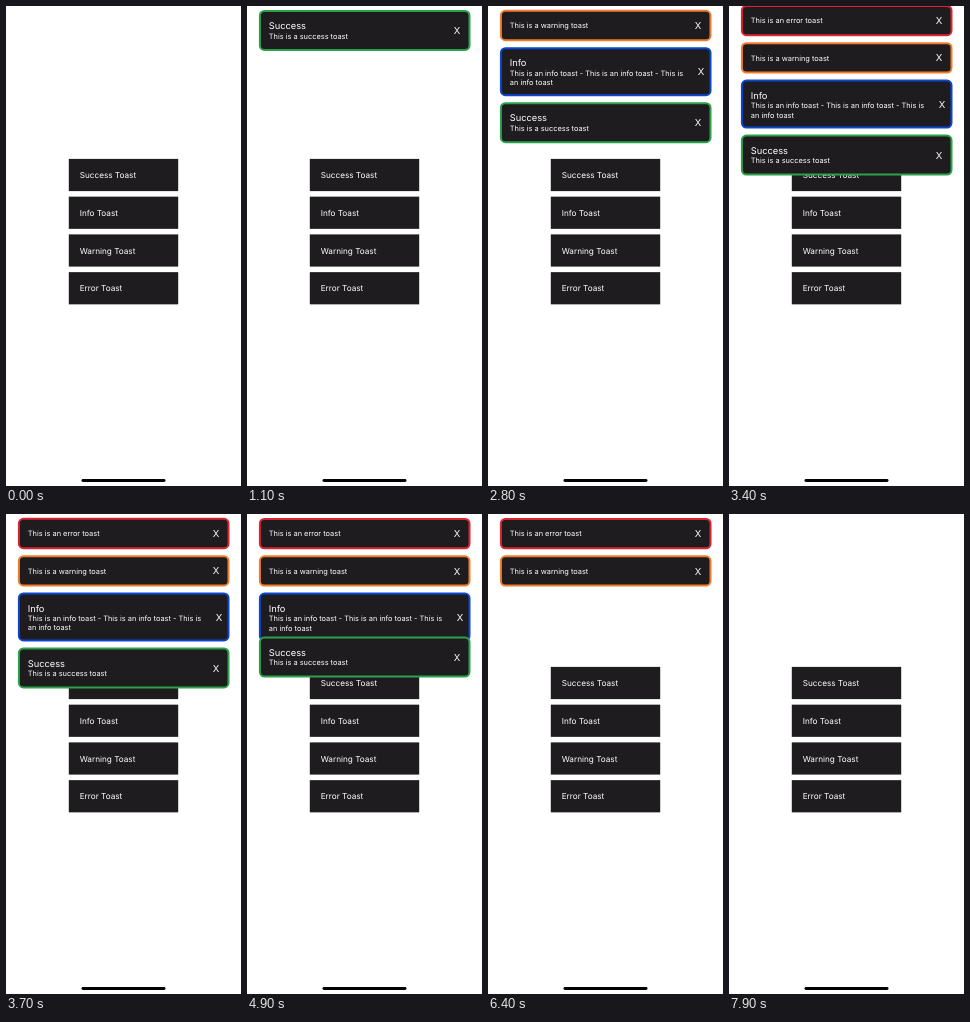
Animation, 235 px wide and 480 px high, one loop 8400 ms. Source, as an HTML page:

```html
<!DOCTYPE html>
<html lang="en">
<head>
<meta charset="utf-8">
<title>Toast stack</title>
<style>
  html, body { margin: 0; width: 100%; height: 100%; overflow: hidden; background: #fff; }
  svg { display: block; width: 235px; height: 480px; }
  text { font-family: Inter, sans-serif; fill: #fff; text-rendering: geometricPrecision; }
  .button { font-size: 8.2px; }
  .title { font-size: 9.3px; }
  .body { font-size: 7.4px; }
  .close { font-size: 9.6px; text-anchor: middle; }
</style>
</head>
<body>
<svg id="stage" viewBox="0 0 235 480"></svg>
<script>
const LOOP = 8400, STEP = 100, GAP = 6, TOP = 4;
const DARK = '#1f1c20';
const stage = document.getElementById('stage');

// Oldest first; enter and leave are start times in ms.
const toasts = [
  { color: '#2ba24a', height: 41, enter: 450, leave: 4857, title: 'Success',
    lines: ['This is a success toast'] },
  { color: '#0b46d2', height: 49, enter: 1350, leave: 5770, title: 'Info', closeX: 213,
    lines: ['This is an info toast - This is an info toast - This is', 'an info toast'] },
  { color: '#f07c2c', height: 31.3, enter: 2250, leave: 6800, lines: ['This is a warning toast'] },
  { color: '#dc2430', height: 31.3, enter: 3150, leave: 7740, lines: ['This is an error toast'] }
];

function add(parent, tag, attrs, content = '') {
  const node = document.createElementNS('http://www.w3.org/2000/svg', tag);
  for (const name in attrs) node.setAttribute(name, attrs[name]);
  node.textContent = content;
  return parent.appendChild(node);
}

const label = (parent, kind, x, y, content) => add(parent, 'text', { class: kind, x, y }, content);

['Success', 'Info', 'Warning', 'Error'].forEach((name, i) => {
  const y = 152.9 + i * 37.75;
  add(stage, 'rect', { x: 62.8, y, width: 109.4, height: 32.2, fill: DARK });
  label(stage, 'button', 73.7, y + 19.2, name + ' Toast');
});
add(stage, 'rect', { x: 75.5, y: 473, width: 84, height: 2.9, rx: 1.45 });

// Older toasts are painted above newer ones.
[...toasts].reverse().forEach(toast => {
  const { color, height, title, lines, closeX = 210 } = toast;
  const group = toast.group = add(stage, 'g', {});
  add(group, 'rect', { x: 12.9, y: 1, width: 209.6, height: height - 2, rx: 4.5,
    fill: DARK, stroke: color, 'stroke-width': 2 });
  if (title) label(group, 'title', 21.7, 19.3, title);
  lines.forEach((line, i) => label(group, 'body', 21.8, (title ? 28.7 : 18.4) + i * 9.3, line));
  label(group, 'close', closeX, height / 2 + 3.6, 'X');
});

// Critically damped spring from 0 to 1.
function spring(ms) {
  const x = Math.max(0, ms) * 0.014;
  return 1 - (1 + x) * Math.exp(-x);
}

// Nearly constant upward speed, easing slightly.
function lift(ms) {
  const t = Math.min(Math.max(0, ms), 2000);
  return 0.26 * t - 0.00006 * t * t;
}

function draw(now) {
  const time = Math.floor(now % LOOP / STEP) * STEP;
  let pushed = 0;
  for (let i = toasts.length - 1; i >= 0; i--) {
    const { group, height, enter, leave } = toasts[i];
    pushed += (height + GAP) * spring(time - enter);
    const y = TOP - GAP - height + pushed - lift(time - leave);
    group.setAttribute('transform', `translate(0 ${y.toFixed(2)})`);
    group.setAttribute('visibility', y > -height ? 'visible' : 'hidden');
  }
}

const start = performance.now();
function tick() {
  draw(performance.now() - start);
  requestAnimationFrame(tick);
}
tick();
</script>
</body>
</html>
```
